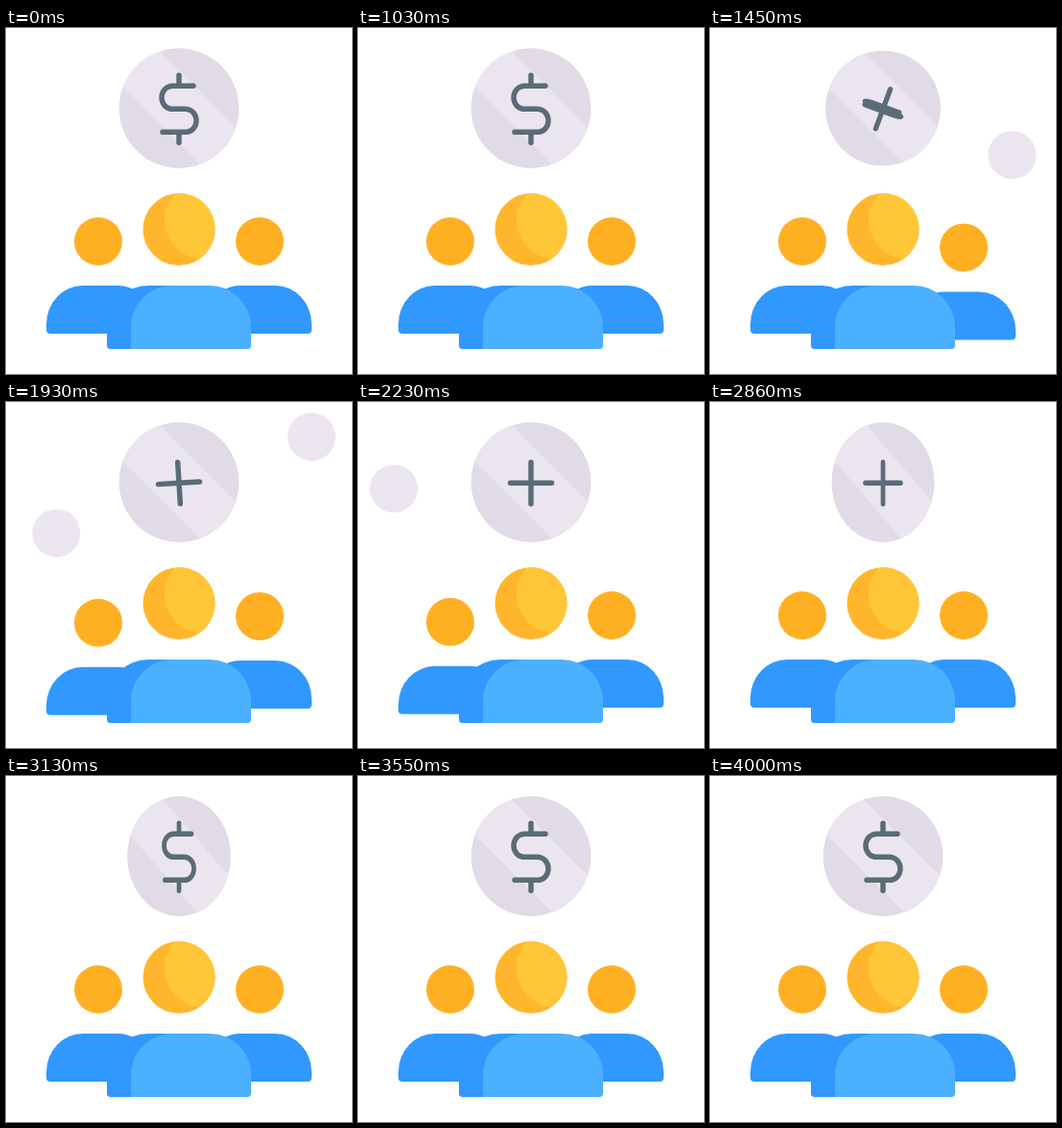
An HTML page for the animation above (4.03 s loop, 360 by 360 pixels).

```html
<!DOCTYPE html>
<html lang="en">
<head>
<meta charset="utf-8">
<title>Shared funds</title>
<style>
html, body { margin: 0; width: 100%; height: 100%; overflow: hidden; background: #fff; }
svg { display: block; width: 100vw; height: 100vh; }
</style>
</head>
<body>
<svg viewBox="0 0 360 360">
  <defs>
    <clipPath id="disc"><circle r="62.5"/></clipPath>
    <path id="leftPath" d="M96 222C70 165 37 120 37 86C37 58 50 42 72 42C90 42 135 50 180 84"/>
    <path id="rightPath" d="M264 222C290 165 331 120 331 82C331 52 326 35 312 35C285 35 240 48 180 84"/>
    <g id="member">
      <circle cx="96" cy="222" r="25" fill="#ffb022"/>
      <path fill="#3098ff" d="M42 314V308A38 40 0 0 1 80 268H116Q126 268 134 273L150 290V318H46Q42 318 42 314Z"/>
    </g>
  </defs>

  <circle id="leftCoin" r="25" fill="#ebe5f0"/>
  <circle id="rightCoin" r="25" fill="#ebe5f0"/>

  <g id="coin">
    <g clip-path="url(#disc)">
      <circle r="62.5" fill="#e0dbe6"/>
      <rect x="-70" y="-27" width="140" height="54" transform="translate(.7 -.7) rotate(45)" fill="#ebe5f0"/>
    </g>
    <path id="glyph" fill="none" stroke="#5b6b78" stroke-width="5.5" stroke-linecap="round" stroke-linejoin="round"/>
  </g>

  <g id="left"><use href="#member"/></g>
  <g id="right"><use href="#member" transform="translate(360) scale(-1 1)"/></g>

  <circle cx="180" cy="209.5" r="37.5" fill="#ffb62c"/>
  <path fill="#ffc738" d="M176 172.2A37.5 37.5 0 0 1 201 240.6C168 235 153 198 176 172.2Z"/>
  <path fill="#3098ff" d="M105 330V311A43 43 0 0 1 148 268H180V334H109Q105 334 105 330Z"/>
  <path fill="#4ab0ff" d="M130 334V311A43 43 0 0 1 173 268H212A43 43 0 0 1 255 311V330Q255 334 251 334Z"/>
</svg>
<script>
const LOOP = 4030, FLIGHT = 920, LAG = 480;
const $ = id => document.getElementById(id);
const progress = (t, start, length) => Math.min(1, Math.max(0, (t - start) / length));
const ease = u => (1 - Math.cos(Math.PI * u)) / 2;
const bump = u => Math.sin(Math.PI * u);
const mix = (a, b, u) => a + (b - a) * u;

// Quick launch, slow top, quick fall into the large coin.
function fly(side, t) {
  const x = progress(t, 1230, FLIGHT);
  const u = x + x * (1 - x) * (0.863 - 2.44 * x);
  const path = $(side + 'Path'), coin = $(side + 'Coin');
  const p = path.getPointAtLength(u * path.getTotalLength());
  coin.setAttribute('cx', p.x);
  coin.setAttribute('cy', p.y);
  coin.style.visibility = x > 0 && x < 1 ? 'visible' : 'hidden';
}

function recoil(side, t, depth) {
  $(side).setAttribute('transform', `translate(0 ${depth * bump(progress(t, 1200, 760))})`);
}

// m = 0 is a dollar sign, m = 1 is a plus.
function glyphPath(m) {
  const w = mix(1, 1.2, m), h = 1 - m;
  const at = (x, y) => `${x * w} ${y * h} `;
  const inner = mix(24, 0, m), outer = mix(35, 21.5, m);
  return 'M' + at(15, -24) + 'L' + at(-6, -24) +
    'C' + at(-22, -24) + at(-22, 0) + at(-6, 0) +
    'L' + at(6, 0) + 'C' + at(22, 0) + at(22, 24) + at(6, 24) + 'L' + at(-17, 24) +
    `M0 ${-outer}V${-inner}M0 ${inner}V${outer}`;
}

function draw(t) {
  fly('right', t);
  fly('left', t - LAG);
  recoil('right', t, 7.5);
  recoil('left', t - LAG, 9);

  const flip = ease(progress(t, 2700, 590));
  const isBack = flip >= 0.5;
  const morph = isBack ? 0 : ease(progress(t, 1180, 340));
  const turn = isBack ? 0 : 90 * ease(progress(t, 1180, 860));
  const size = 1 - 0.04 * bump(progress(t, 1150, 600));
  const width = size * Math.abs(Math.cos(Math.PI * flip));
  $('coin').setAttribute('transform', `translate(180 83.5) scale(${width} ${size})`);
  $('glyph').setAttribute('transform', `translate(0 .8) rotate(${turn})`);
  $('glyph').setAttribute('d', glyphPath(morph));
}

const begin = performance.now();
function tick() {
  draw((performance.now() - begin) % LOOP);
  requestAnimationFrame(tick);
}
tick();
</script>
</body>
</html>
```
